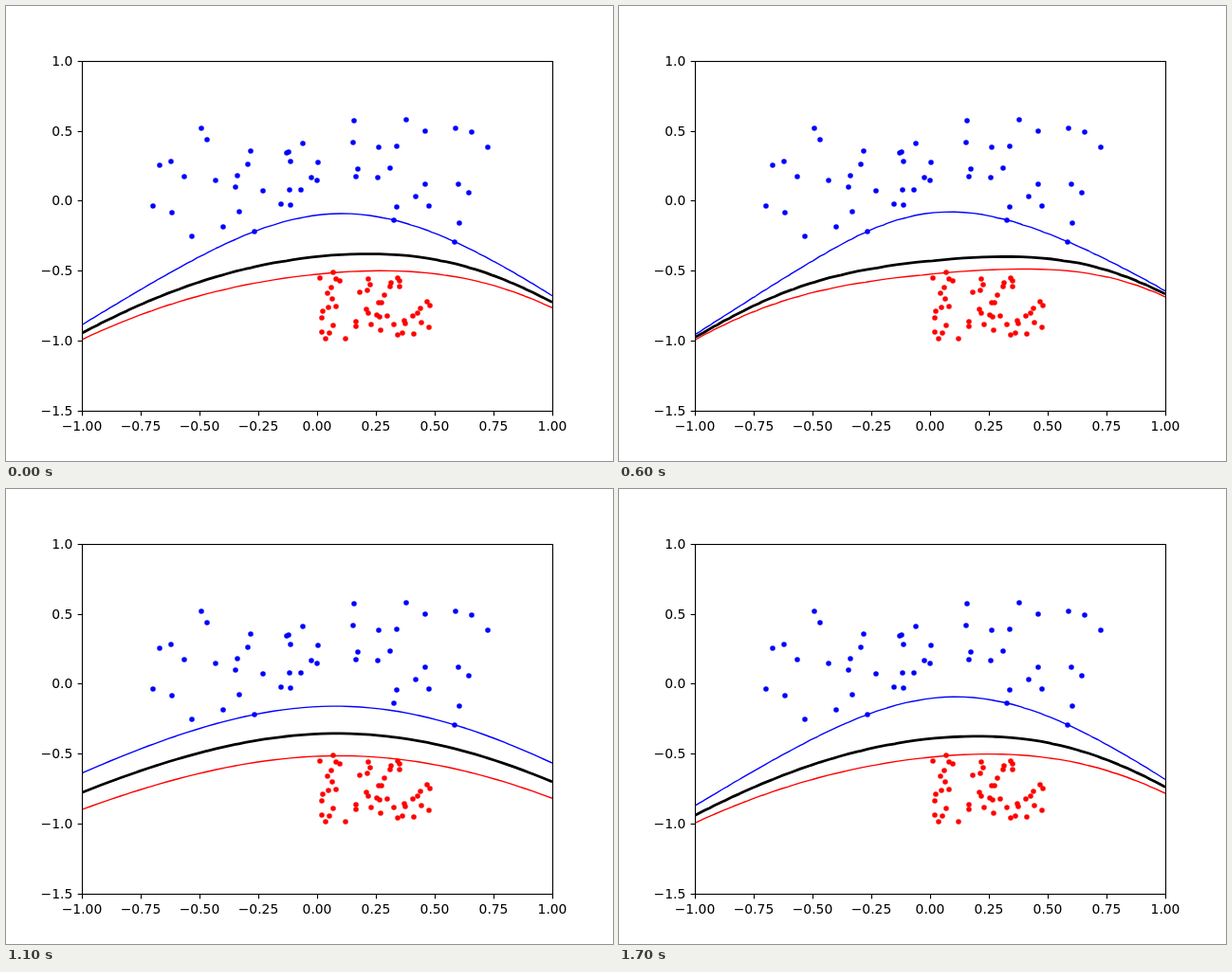
Recreate the animation shown at these times as an HTML page with a canvas. Size 640x480 px, loop 1.8 s.

```html
<!DOCTYPE html>
<html lang="en">
<head>
<meta charset="utf-8">
<title>SVM with a polynomial kernel of varying degree</title>
<style>
html, body { margin: 0; width: 100%; height: 100%; overflow: hidden; background: #fff; }
canvas { display: block; }
</style>
</head>
<body>
<canvas id="plot" width="640" height="480"></canvas>
<script>
const ctx = document.getElementById('plot').getContext('2d');
const LEFT = 80, TOP = 57.6, WIDTH = 496, HEIGHT = 369.6;
const toX = x => LEFT + (x + 1) / 2 * WIDTH;
const toY = y => TOP + (1 - y) / 2.5 * HEIGHT;
const snap = v => Math.floor(v + 0.5) + 0.5;

// Scatter points as x, y pairs in pixels
const blueDots = [
  206,129, 212,141, 162,168, 174,164, 188,180, 221,184, 258,153, 255,167, 244,179, 242,191,
  271,195, 246,217, 229,233, 196,243, 262,238, 155,211, 175,218, 296,155, 298,154, 300,164,
  313,145, 322,181, 329,165, 328,184, 299,194, 311,194, 290,209, 300,210, 367,121, 366,144,
  393,149, 412,148, 422,120, 442,132, 474,129, 491,133, 508,149, 371,172, 369,180, 392,181,
  405,171, 442,188, 477,188, 488,197, 432,201, 412,212, 446,211, 409,226, 478,229, 473,249];
const redDots = [
  331,287, 345,281, 348,288, 352,290, 343,297, 339,303, 344,309, 340,318, 348,317, 334,322,
  333,329, 345,337, 333,344, 341,345, 337,351, 358,351, 369,333, 369,338, 373,302, 381,300,
  384,294, 382,288, 399,305, 393,313, 396,313, 380,320, 382,324, 391,326, 394,328, 402,327,
  385,336, 395,342, 405,296, 406,292, 413,287, 415,290, 415,296, 409,336, 420,332, 421,335,
  413,347, 418,345, 430,346, 429,327, 434,324, 437,319, 444,312, 447,316, 438,334, 446,339];

// Support vectors; the last one binds only at higher degrees
const support = [
  { x: -0.266, y: -0.22, label: 1 },
  { x: 0.587, y: -0.2947, label: 1 },
  { x: 0.0706, y: -0.5145, label: -1 },
  { x: 0.3266, y: -0.139, label: 1 }];

// Gauss-Jordan elimination on an augmented matrix
function solve(m) {
  const n = m.length;
  for (let k = 0; k < n; k++) {
    for (let i = 0; i < n; i++) {
      if (i === k) continue;
      const factor = m[i][k] / m[k][k];
      for (let j = k; j <= n; j++) m[i][j] -= factor * m[k][j];
    }
  }
  return m.map((row, i) => row[n] / row[i]);
}

function fit(vectors, degree) {
  const kernel = (a, b) => (1 + a.x * b.x + a.y * b.y) ** degree;
  const rows = vectors.map(a => [...vectors.map(b => kernel(a, b)), 1, a.label]);
  rows.push([...vectors.map(() => 1), 0, 0]);
  const weights = solve(rows), bias = weights.pop();
  return p => vectors.reduce((sum, v, i) => sum + weights[i] * kernel(v, p), bias);
}

function classifier(degree) {
  const decide = fit(support.slice(0, 3), degree);
  return decide(support[3]) < 1 ? fit(support, degree) : decide;
}

// Contours are interpolated linearly on a regular grid
const N = 50;
const gridX = i => -1 + 2 * i / (N - 1);
const gridY = j => -1.5 + 2.5 * j / (N - 1);

function contour(values, level, color, width) {
  const points = [];
  const cross = (i, j, di, dj) => {
    if (i + di >= N || j + dj >= N) return;
    const a = values[i][j] - level, b = values[i + di][j + dj] - level;
    if (a < 0 === b < 0) return;
    const t = a / (a - b);
    points.push([toX(gridX(i + di * t)), toY(gridY(j + dj * t))]);
  };
  for (let i = 0; i < N; i++) {
    for (let j = 0; j < N; j++) {
      cross(i, j, 1, 0);
      cross(i, j, 0, 1);
    }
  }
  points.sort((p, q) => p[0] - q[0]);
  ctx.beginPath();
  points.forEach(p => ctx.lineTo(...p));
  ctx.strokeStyle = color;
  ctx.lineWidth = width;
  ctx.lineJoin = 'round';
  ctx.stroke();
}

function dots(list, color) {
  ctx.fillStyle = color;
  for (let i = 0; i < list.length; i += 2) {
    ctx.beginPath();
    ctx.arc(list[i], list[i + 1], 2.78, 0, 2 * Math.PI);
    ctx.fill();
  }
}

function line(x1, y1, x2, y2) {
  ctx.beginPath();
  ctx.moveTo(x1, y1);
  ctx.lineTo(x2, y2);
  ctx.stroke();
}

function axes() {
  const left = snap(LEFT), right = snap(LEFT + WIDTH);
  const top = snap(TOP), bottom = snap(TOP + HEIGHT);
  const format = (v, digits) => v.toFixed(digits).replace('-', '\u2212');
  ctx.strokeStyle = ctx.fillStyle = '#000';
  ctx.lineWidth = 1.11;
  ctx.lineJoin = 'miter';
  ctx.font = '13.89px "DejaVu Sans", sans-serif';
  ctx.strokeRect(left, top, right - left, bottom - top);
  ctx.textAlign = 'center';
  for (let v = -1; v <= 1; v += 0.25) {
    const x = snap(toX(v));
    line(x, bottom, x, bottom + 4.86);
    ctx.fillText(format(v, 2), toX(v), 448);
  }
  ctx.textAlign = 'right';
  for (let v = -1.5; v <= 1; v += 0.5) {
    const y = snap(toY(v));
    line(left, y, left - 4.86, y);
    ctx.fillText(format(v, 1), 70.3, y + 4.5);
  }
}

function draw(degree) {
  const decide = classifier(degree);
  const values = Array.from({ length: N }, (_, i) =>
    Array.from({ length: N }, (_, j) => decide({ x: gridX(i), y: gridY(j) })));
  ctx.fillStyle = '#fff';
  ctx.fillRect(0, 0, 640, 480);
  dots(blueDots, '#00f');
  dots(redDots, '#f00');
  ctx.save();
  ctx.beginPath();
  ctx.rect(LEFT, TOP, WIDTH, HEIGHT);
  ctx.clip();
  contour(values, -1, '#f00', 1.39);
  contour(values, 0, '#000', 2.78);
  contour(values, 1, '#00f', 1.39);
  ctx.restore();
  axes();
}

// Degrees run 10 to 19, then 2 to 9, one every 100 ms
let shown = 0;
function tick() {
  const step = Math.floor(performance.now() / 100) % 18;
  const degree = step < 10 ? step + 10 : step - 8;
  if (degree !== shown) draw(shown = degree);
  requestAnimationFrame(tick);
}
tick();
</script>
</body>
</html>
```
